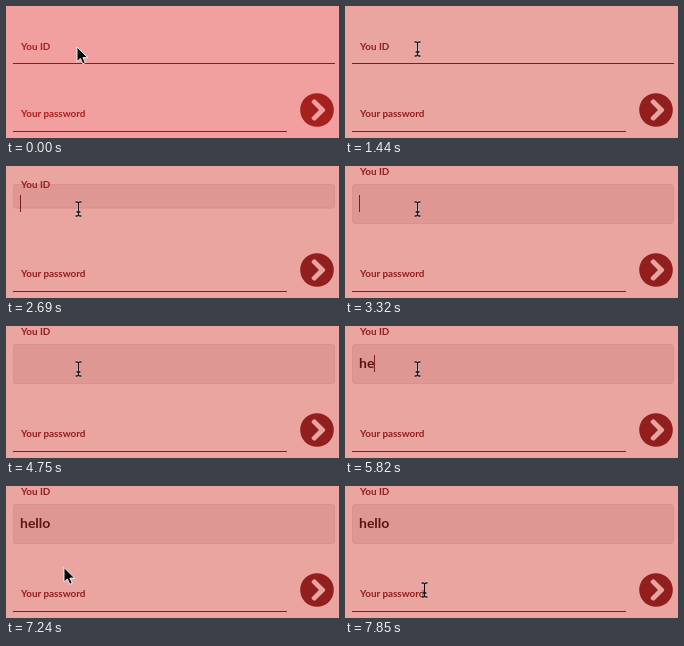
Recreate the animation shown at these times as an HTML page. Size 333 by 132 pixels, loop 8 s.

```html
<!DOCTYPE html>
<html lang="en">
<head>
<meta charset="utf-8">
<title>Login form</title>
<style>
  html, body { margin: 0; width: 100%; height: 100%; overflow: hidden; }
  svg { display: block; width: 333px; height: 132px; background: var(--bg); --bg: #f19f9f; --ink: #a6201e; --line: #7f1f1f; }
  svg.focus { --bg: #eaa5a1; --ink: #901f1e; --line: #7c1e1e; }
  text { font: bold 9.9px Lato, "Open Sans", sans-serif; fill: var(--ink); white-space: pre; }
  #value { font-size: 14px; fill: #5c1212; }
  #caret { fill: #7a1f1f; }
  .line { fill: var(--line); }
  .box { fill: #821e1e1a; stroke: #821e1e16; }
  #beam { fill: none; stroke: #111; stroke-width: 1.3; }
  #beam .halo { stroke: #fff; stroke-opacity: .6; stroke-width: 2.4; }
</style>
</head>
<body>
<svg id="stage" viewBox="0 0 333 132">
  <defs>
    <path id="beamShape" d="M-3 -7H-1.5Q0 -7 0 -5.5V5.5Q0 7 -1.5 7H-3M3 -7H1.5Q0 -7 0 -5.5M3 7H1.5Q0 7 0 5.5M-2 3H2"/>
  </defs>

  <rect id="field" x="7" width="322"/>
  <text id="label" x="15">You ID</text>
  <text id="value" x="14" y="42"></text>
  <rect id="caret" y="29" width="1" height="17"/>

  <text x="15" y="111">Your password</text>
  <rect class="line" x="7" y="125" width="274" height="1"/>

  <g transform="translate(311 104) scale(.0678) translate(-256 -256)">
    <circle cx="256" cy="256" r="248" fill="var(--ink)"/>
    <path fill="var(--bg)" d="M369.9 239L234.4 103.5c-9.4-9.4-24.6-9.4-33.9 0l-17 17c-9.4 9.4-9.4 24.6 0 33.9L285.1 256 183.5 357.6c-9.4 9.4-9.4 24.6 0 33.9l17 17c9.4 9.4 24.6 9.4 33.9 0L369.9 273c9.4-9.4 9.4-24.6 0-34z"/>
  </g>

  <g id="pointer">
    <path id="arrow" d="M0 0V14.6L3.4 11.5 5.8 16.8 8.3 15.7 5.9 10.6H10.6Z" stroke="#fff" stroke-width=".9"/>
    <g id="beam">
      <use href="#beamShape" class="halo"/>
      <use href="#beamShape"/>
    </g>
  </g>
</svg>
<script>
const $ = id => document.getElementById(id);

const LOOP = 8000, HOVER = 1440;
const OPEN = 2205, PHASE = 307;           // line rises, then the box unfolds
const STEP_START = 2250, STEP = 87.5;
const TOP = 18, BOTTOM = 57;
const WORD = 'hello';
const keys = [5460, 5820, 6090, 6180, 6350];
const blinks = [2430, 2870, 3320, 3770, 4300, 4750, 5280, 6890, 7330, 7850];
// time, x, y, text beam?
const moves = [
  [0, 71, 41, 0], [HOVER, 72.5, 43, 1], [7150, 67, 60, 0], [7240, 58, 81.5, 0],
  [7330, 61, 92, 1], [7420, 69, 99, 1], [7500, 76, 103, 1], [7590, 81, 105, 1],
  [7680, 79.5, 104, 1]
];

const passed = (times, t) => times.filter(x => x <= t).length;
const lerp = (a, b, p) => a + (b - a) * p;
function ease(p) {
  p = Math.min(1, Math.max(0, p));
  return p * p * (3 - 2 * p);
}
function set(id, attrs) {
  for (const k in attrs) $(id).setAttribute(k, attrs[k]);
}
const show = (id, on) => $(id).style.display = on ? '' : 'none';

function draw(t) {
  $('stage').classList.toggle('focus', t >= HOVER);

  const held = t < STEP_START ? 0 : STEP_START + Math.floor((t - STEP_START) / STEP) * STEP;
  const rise = ease((held - OPEN) / PHASE);
  const unfold = ease((held - OPEN - PHASE) / PHASE);
  if (unfold > 0) {
    set('field', { class: 'box', x: 7.5, width: 321, y: TOP + .5, height: lerp(0, BOTTOM - TOP, unfold), rx: 2, opacity: 1 });
  } else {
    set('field', { class: 'line', x: 7, width: 322, y: lerp(BOTTOM, TOP, rise), height: 1, rx: 0, opacity: lerp(1, .1, rise) });
  }
  set('label', { y: lerp(43.5, 8.5, unfold) });

  $('value').textContent = WORD.slice(0, passed(keys, t));
  set('caret', { x: 14 + Math.floor($('value').getComputedTextLength()) });
  show('caret', passed(blinks, t) % 2);

  const [, x, y, beam] = moves[passed(moves.map(m => m[0]), t) - 1];
  set('pointer', { transform: `translate(${x} ${y})` });
  show('beam', beam);
  show('arrow', !beam);
}

const start = performance.now();
function tick() {
  draw((performance.now() - start) % LOOP);
  requestAnimationFrame(tick);
}
tick();
</script>
</body>
</html>
```
